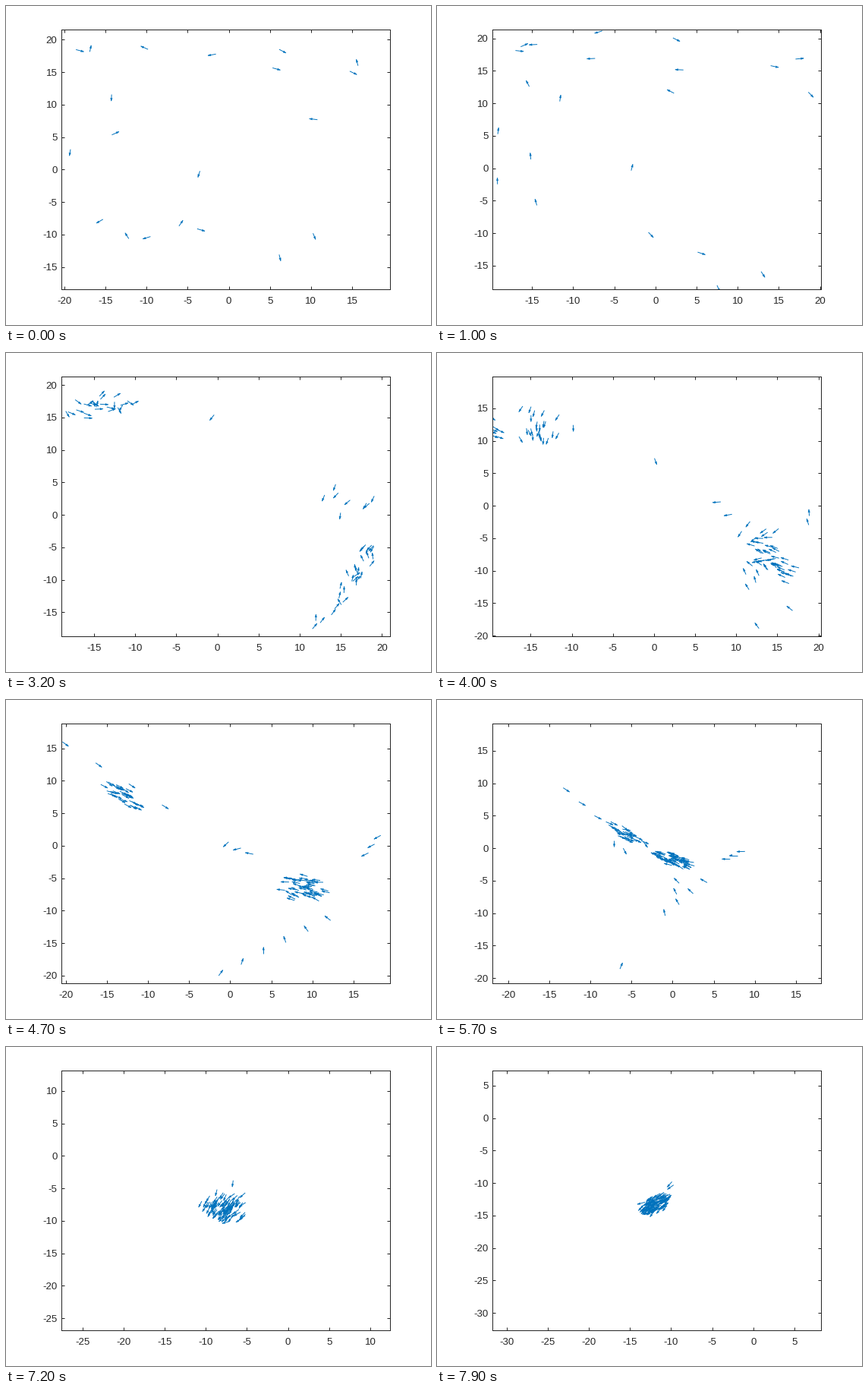
A matplotlib script for the animation above (8000 ms loop, 560 by 420 pixels).

```python
import numpy as np
import matplotlib.pyplot as plt
from matplotlib.animation import FuncAnimation
from matplotlib.collections import LineCollection, PolyCollection
from matplotlib.ticker import MultipleLocator

W, H, DPI = 560, 420, 100
LEFT, BOTTOM, WIDE, TALL = 73, 46.8, 433.45, 342
HALF = 20                       # half the visible range, in data units
SCALE = np.array([WIDE, TALL]) / (2 * HALF)
COUNT = 100
BLUE, DARK = "#0072BD", "#262626"
PT = 72 / DPI                   # points per pixel
rng = np.random.default_rng(12)

# View centre at the key steps
STEPS = np.array([0, 16, 29, 44, 54, 62, 76])
CENTRES = np.array([(-0.35, 1.55), (0.75, 1.15), (1.03, 1.27), (-0.53, -1.2),
                    (-1.91, -0.83), (-4.03, -2.3), (-11.73, -12.7)])


def scatter(n, centre):
    """Birds anywhere in the view, flying any way."""
    spots = centre + rng.uniform(-HALF + 1, HALF - 1, (n, 2))
    return np.column_stack([spots, rng.uniform(0, 360, n)])


def flock(n, x, y, sx, sy, slope, angle, spread, turn=0):
    """An oval group; headings in degrees may fan out with height."""
    r, a = 2 * rng.random(n) ** 0.6, rng.uniform(0, 2 * np.pi, n)
    dx = sx * r * np.cos(a)
    dy = sy * r * np.sin(a) + slope * dx
    head = angle + turn * dy + rng.normal(0, spread, n)
    return np.column_stack([x + dx, y + dy, head])


def row(n, start, end, first, last):
    """Stragglers strung evenly between two points, headings blending."""
    return np.linspace([*start, first], [*end, last], n)


SCENES = [
    [scatter(20, CENTRES[0])],
    # gathering in two corners
    [flock(16, -16.5, 17.2, 1.4, 1, 0, 60, 100),
     flock(7, 16.6, -17, 0.7, 0.9, 0, 180, 70),
     row(2, (-8.6, 16.7), (-6.1, 16.3), 174, 168),
     row(2, (-16.5, 8.7), (-4.8, 9.9), 105, 132),
     row(5, (18.8, 16.2), (20.9, -4), 243, 240),
     row(2, (9.3, 15.6), (10.7, -18.2), -32, -18)],
    # a band on the left, a rising streak on the right
    [flock(25, -14.5, 16.6, 2.4, 0.9, 0, -15, 45),
     flock(24, 15.3, -12, 2, 0.8, 1.5, 75, 20),
     flock(6, 18.5, -4.5, 0.5, 0.4, 0, 235, 8),
     flock(8, 16.5, 2.5, 1.8, 1.5, 0, 248, 10),
     row(1, (-0.4, 15.4), (0, 0), 238, 0)],
    # two flocks turning towards each other
    [flock(33, -13.6, 8.1, 1.3, 0.7, -0.6, -32, 7),
     flock(51, 9.5, -6.8, 1.5, 1.1, -0.1, 158, 7, 8),
     row(4, (-20.4, 16), (-8.3, 6.3), -43, -38),
     row(6, (-1.4, -20), (12.2, -11.5), 60, 135),
     row(3, (18.3, 1.6), (16.8, -1.1), 215, 212),
     row(3, (-0.2, 0.6), (2.8, -1.3), 230, 166)],
    # about to meet
    [flock(29, -5.8, 2.3, 1.2, 0.5, -0.65, -32, 11),
     flock(56, 0.6, -2.05, 1.2, 0.5, -0.35, 153, 8),
     row(3, (-13.3, 9.3), (-9.5, 5), -40, -33),
     row(2, (-7.1, 1.2), (-6, 0), 270, 292),
     row(3, (8.8, -0.5), (7, -1.7), 182, 178),
     row(4, (4.2, -5.3), (-0.9, -10.4), 145, 100),
     row(2, (0.8, -5.4), (0.5, -7.1), 128, 112),
     row(1, (-6.4, -18.6), (0, 0), 72, 0)],
    # mixing
    [flock(49, -5.5, -1.3, 0.75, 1.1, 0, 243, 27),
     flock(46, -2.3, -3.4, 1.1, 0.65, -0.15, 207, 17),
     row(3, (0.8, -1.1), (0, -4.8), 203, 226),
     row(2, (-7.9, 3.5), (-4.9, -10.6), -62, 91)],
    # one flock
    [flock(98, -11.6, -12.9, 0.95, 0.65, 0.4, 224, 8),
     row(2, (-9.9, -9.8), (-9.7, -10.3), 235, 222)],
]


def birds(k):
    scene = np.vstack(SCENES[k])
    scene[:, 2] = np.radians(scene[:, 2])
    return scene


def direction(a):
    return np.stack([np.cos(a), np.sin(a)], axis=-1)


def match(now, later, n):
    """Pair birds so that paths forward and backward meet halfway."""
    ahead = now[:, :2] + direction(now[:, 2]) * n / 2
    behind = later[:, :2] - direction(later[:, 2]) * n / 2
    cost = np.zeros((COUNT, COUNT))
    cost[:len(now)] = ((ahead[:, None] - behind[None]) ** 2).sum(-1)
    cost = cost.tolist()
    pick = list(range(COUNT))
    for _ in range(15):
        changed = False
        for i in range(COUNT):
            for j in range(i):
                a, b = pick[i], pick[j]
                if cost[i][b] + cost[j][a] < cost[i][a] + cost[j][b] - 1e-9:
                    pick[i], pick[j] = b, a
                    changed = True
        if not changed:
            break
    return pick[:len(now)]


def arrive_from(bird, n, centre):
    """Step back along an arc to a place outside the view."""
    for bend in np.radians(np.arange(0, 181, 12)):
        for a in (bend, -bend):
            spot = bird[:2] - 0.94 * n * direction(bird[2] + a)
            if np.abs(spot - centre).max() > HALF + 1.2:
                return [*spot, bird[2] + 2 * a]
    edge = spot - centre
    return [*(centre + edge / np.abs(edge).max() * (HALF + 2)), bird[2]]


def build_keys():
    """Work back from the last scene so each bird keeps its index."""
    keys = [birds(-1)]
    for k in range(len(STEPS) - 2, -1, -1):
        now, later, n = birds(k), keys[0], STEPS[k + 1] - STEPS[k]
        full = np.array([arrive_from(b, n, CENTRES[k]) for b in later])
        full[match(now, later, n)] = now
        keys.insert(0, full)
    return np.array(keys)


def hermite(p, q, u, v, t):
    """Point and slope on a cubic from p to q with end slopes u, v."""
    d = q - p
    b, c = 3 * d - 2 * u - v, u + v - 2 * d
    return p + t * (u + t * (b + t * c)), u + t * (2 * b + 3 * t * c)


KEYS = build_keys()
DRIFT = np.gradient(CENTRES, STEPS, axis=0)


def state(step):
    k = min(np.searchsorted(STEPS, step, side="right") - 1, len(STEPS) - 2)
    n = STEPS[k + 1] - STEPS[k]
    t = (step - STEPS[k]) / n
    a, b = KEYS[k], KEYS[k + 1]
    reach = np.linalg.norm(b[:, :2] - a[:, :2], axis=1)[:, None] + 0.1
    pos, vel = hermite(a[:, :2], b[:, :2], reach * direction(a[:, 2]),
                       reach * direction(b[:, 2]), t)
    vel /= np.linalg.norm(vel, axis=1)[:, None] + 1e-9
    centre, _ = hermite(CENTRES[k], CENTRES[k + 1],
                        DRIFT[k] * n, DRIFT[k + 1] * n, t)
    return pos, vel, centre


plt.rcParams.update({"font.family": "Liberation Sans",
                     "axes.unicode_minus": False})
fig = plt.figure(figsize=(W / DPI, H / DPI), dpi=DPI, facecolor="white")
ax = fig.add_axes([LEFT / W, BOTTOM / H, WIDE / W, TALL / H])
for side in ax.spines.values():
    side.set(color=DARK, linewidth=PT)
for axis in (ax.xaxis, ax.yaxis):
    axis.set_major_locator(MultipleLocator(5))
ax.tick_params(direction="in", top=True, right=True, length=4.3 * PT,
               width=PT, color=DARK, labelcolor=DARK, labelsize=13.3 * PT)
ax.tick_params(axis="x", pad=10.2 * PT)
ax.tick_params(axis="y", pad=5.5 * PT)

shafts = ax.add_collection(
    LineCollection([], colors=BLUE, linewidths=0.95 * PT), autolim=False)
heads = ax.add_collection(
    PolyCollection([], facecolors=BLUE, edgecolors=BLUE,
                   linewidths=0.3 * PT), autolim=False)


def draw(frame):
    pos, vel, centre = state(max(0, frame - 3))    # the opening holds
    tip = pos + vel
    px = vel * SCALE
    unit = px / np.linalg.norm(px, axis=1)[:, None]
    side = unit[:, ::-1] * [-1, 1] * 1.3 / SCALE
    base = tip - unit * 3.8 / SCALE
    shafts.set_segments(np.stack([pos, tip], axis=1))
    heads.set_verts(np.stack([tip, base + side, base - side], axis=1))
    ax.set_xlim(centre[0] - HALF, centre[0] + HALF)
    ax.set_ylim(centre[1] - HALF, centre[1] + HALF)
    return shafts, heads


anim = FuncAnimation(fig, draw, frames=80, interval=100, repeat=True,
                     repeat_delay=0, blit=False)
plt.show()
```
